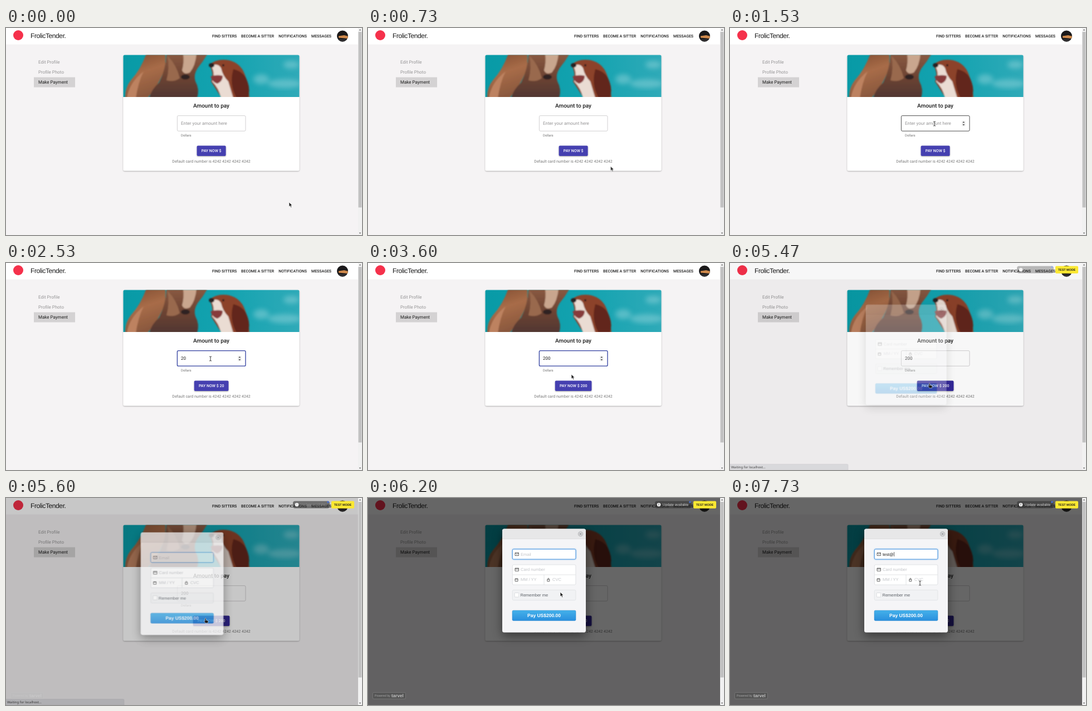
Write an HTML page that moves like this. It is 639 px wide and 372 px high and loops after 8 s.

```html
<!DOCTYPE html>
<html lang="en">
<head>
<meta charset="utf-8">
<title>Payment flow</title>
<style>
html, body { margin: 0; width: 100%; height: 100%; overflow: hidden; background: #f5f3f4; }
svg { display: block; width: 100%; height: 100%; }
text { font-family: Roboto, sans-serif; font-size: 8px; fill: #1c1c1c; white-space: pre; text-rendering: geometricPrecision; }
.mid { text-anchor: middle; }
.muted { fill: #969596; }
.nav text, .label { font-size: 7px; font-weight: 500; }
.brand { font: 12px "Liberation Sans", Arial, sans-serif; letter-spacing: -.4px; }
.form text { font: 7.5px "Liberation Sans", Arial, sans-serif; fill: #c3c5c9; }
.form .remember { fill: #5d6268; }
.form .typed { fill: #222; }
.form .pay { font-size: 8.5px; font-weight: 700; fill: #fff; }
.small { font-family: "Liberation Sans", Arial, sans-serif; }
.icon { fill: none; stroke: #555; stroke-width: .9; }

.anim { animation: 8s linear infinite; }
.step { animation: 8s step-end infinite; }
.field { animation-name: field; }
.spinner { animation-name: spinner; }
.button { animation-name: button; }
.status { animation-name: status; }
.arrow { animation-name: arrow; }
.hand { animation-name: hand; }
.ibeam { animation-name: ibeam; }
.badge { animation-name: badge; }
.pill { animation-name: pill; }
.shade { animation-name: shade; }
.notice { animation-name: notice; }
.focus { animation-name: focus; }
.pointer { animation-name: pointer; }
.modal { animation-name: rise, fade; animation-timing-function: cubic-bezier(.2, .6, .35, 1), linear; transform-origin: 316px 148.5px; }

@keyframes field {
  0%, 100% { stroke: #c6c5c6; stroke-width: .8px; }
  15% { stroke: #222; stroke-width: .8px; }
  22.5% { stroke: #303f9f; stroke-width: 1.3px; }
  54.1% { stroke: #c6c5c6; stroke-width: .8px; }
}
@keyframes spinner { 0%, 54.1%, 100% { opacity: 0; } 15% { opacity: 1; } }
@keyframes button { 0%, 100% { fill: #453fb0; } 49% { fill: #342c9c; } }
@keyframes status { 0%, 73%, 100% { opacity: 0; } 55% { opacity: 1; } }
@keyframes arrow { 0%, 35.6%, 75%, 100% { opacity: 1; } 15%, 66%, 81.3% { opacity: 0; } }
@keyframes hand { 0%, 75%, 100% { opacity: 0; } 66% { opacity: 1; } }
@keyframes ibeam { 0%, 35.6%, 100% { opacity: 0; } 15%, 81.3% { opacity: 1; } }
@keyframes badge { 0%, 100% { opacity: 0; } 67.5% { opacity: 1; } }
@keyframes pill { 0%, 66.5% { opacity: 0; } 70%, 100% { opacity: 1; } }
@keyframes shade { 0%, 68.1% { opacity: 0; } 73.3%, 100% { opacity: 1; } }
@keyframes notice { 0%, 68.5% { opacity: 0; } 73.5%, 100% { opacity: 1; } }
@keyframes focus { 0%, 68.5% { opacity: 0; } 71%, 100% { opacity: 1; } }
@keyframes fade { 0%, 67.5% { opacity: 0; } 70.7%, 100% { opacity: 1; } }
@keyframes rise {
  0%, 67.5% { transform: translateY(27px) scale(.944); }
  73.7%, 100% { transform: none; }
}
@keyframes pointer {
  0%, .9% { transform: translate(508px, 313px); animation-timing-function: ease-in; }
  10.9% { transform: translate(408px, 224px); animation-timing-function: ease-out; }
  18%, 35% { transform: translate(367px, 172px); animation-timing-function: ease-in-out; }
  39.1%, 45.5% { transform: translate(365px, 200px); animation-timing-function: ease-in-out; }
  52.5%, 72.5% { transform: translate(358px, 217px); animation-timing-function: ease-in-out; }
  77%, 78.5% { transform: translate(345px, 169px); animation-timing-function: ease-in-out; }
  85%, 100% { transform: translate(341px, 153px); }
}
</style>
</head>
<body>
<svg viewBox="0 0 639 372" preserveAspectRatio="none">
  <defs>
    <clipPath id="photo"><path d="M210.5 124V51q0-2.5 2.5-2.5h311q2.5 0 2.5 2.5v73z"/></clipPath>
    <clipPath id="face"><circle cx="604" cy="14.5" r="10"/></clipPath>
    <linearGradient id="sky"><stop stop-color="#089aa6"/><stop offset=".6" stop-color="#14a3b0"/><stop offset="1" stop-color="#2faab8"/></linearGradient>
    <linearGradient id="fur" x2=".3" y2="1"><stop stop-color="#7d4a30"/><stop offset=".5" stop-color="#a86c48"/><stop offset="1" stop-color="#8a583e"/></linearGradient>
    <linearGradient id="coat" x2="0" y2="1"><stop stop-color="#8a5a42"/><stop offset=".5" stop-color="#6e4433"/><stop offset="1" stop-color="#503630"/></linearGradient>
    <linearGradient id="blue" x2="0" y2="1"><stop stop-color="#44b1ea"/><stop offset="1" stop-color="#2a8fdd"/></linearGradient>
    <filter id="soft"><feGaussianBlur stdDeviation="4"/></filter>
    <filter id="fuzz"><feGaussianBlur stdDeviation="1.2"/></filter>
    <filter id="lift" x="-10%" y="-10%" width="120%" height="125%"><feDropShadow dx="0" dy="1" stdDeviation=".8" flood-opacity=".35"/></filter>
    <filter id="drop" x="-30%" y="-30%" width="160%" height="160%"><feDropShadow dx="0" dy="6" stdDeviation="9" flood-opacity=".45"/></filter>
    <filter id="glow" x="-10%" y="-30%" width="120%" height="160%"><feDropShadow dx="0" dy="0" stdDeviation="1.2" flood-color="#4a9de8" flood-opacity=".8"/></filter>
  </defs>

  <rect width="639" height="372" fill="#f5f3f4"/>
  <rect width="632" height="29.5" fill="#fff"/>
  <circle cx="22" cy="13" r="9" fill="#f5314b"/>
  <text class="brand" x="44" y="18.3">FrolicTender.</text>
  <g class="nav">
    <text x="370" y="17.3">FIND SITTERS</text>
    <text x="422" y="17.3">BECOME A SITTER</text>
    <text x="489.3" y="17.3">NOTIFICATIONS</text>
    <text x="548" y="17.3">MESSAGES</text>
  </g>
  <g clip-path="url(#face)">
    <rect x="594" y="4" width="21" height="21" fill="#1b191a"/>
    <path d="M597 14.5l10-1.5 8 2v4l-6-.5-12-1z" fill="#d08a4c"/>
    <path d="M594 20h20v5h-20z" fill="#2f2e30"/>
  </g>

  <rect x="50" y="88.5" width="74" height="18" fill="#d4d2d3"/>
  <text class="muted" x="58" y="64.3">Edit Profile</text>
  <text class="muted" x="58" y="82.3">Profile Photo</text>
  <text x="58" y="100.4">Make Payment</text>

  <rect x="210.5" y="48.5" width="316" height="208" rx="2.5" fill="#fff" filter="url(#lift)"/>
  <g clip-path="url(#photo)">
    <rect x="210" y="48" width="317" height="76" fill="url(#sky)"/>
    <g fill="#8fd3da" opacity=".5" filter="url(#soft)">
      <ellipse cx="500" cy="100" rx="30" ry="8"/><ellipse cx="458" cy="92" rx="14" ry="9"/>
      <ellipse cx="512" cy="66" rx="14" ry="7"/>
    </g>
    <g filter="url(#fuzz)">
      <path d="M252 46h34q2 26-6 40-9 20-26 40h-40q-1-18 10-32 17-18 28-48z" fill="url(#fur)"/>
      <path d="M247 78q-26 20-30 48h16q4-28 14-48z" fill="#bd8260"/>
      <path d="M288 46h74q-8 14-18 26-8 12-4 24 8 14 3 30h-86q4-16 18-28 12-24 13-52z" fill="url(#coat)"/>
      <path d="M318 46h24q-2 22-12 34-10 5-14-4 4-14 2-30z" fill="#c9a68e"/>
      <path d="M290 50q16 16 22 40-10 8-24 4 6-22 2-44z" fill="#99694d"/>
      <ellipse cx="322" cy="88" rx="8" ry="4.5" fill="#2d2224"/>
      <path d="M365 66q10-9 25-9 22 0 34 17 10 16 13 52h-50q-10-16-19-30 6-14-3-30z" fill="#8c4229"/>
      <path d="M368 68q12-6 18 4 3 14 13 24l9 30h-22q-4-18-16-30 6-16-2-28z" fill="#eadcd3"/>
      <path d="M408 74q20 4 26 24 5 14 0 28h-20q-14-24-6-52z" fill="#62281b"/>
      <path d="M367 87q12-4 22-1 0 10-10 14-8-2-12-13z" fill="#873a3a"/>
      <ellipse cx="369" cy="67" rx="5" ry="4" fill="#272022"/>
      <circle cx="390" cy="67" r="2" fill="#2d1c19"/>
    </g>
  </g>
  <text class="mid" x="368.5" y="143.3" style="font-size:10px;font-weight:500">Amount to pay</text>
  <rect class="step field" x="307.4" y="157.6" width="122.6" height="27.6" rx="2" fill="#fff"/>
  <text id="amount" x="314" y="174.4"></text>
  <g class="step spinner">
    <rect x="416" y="166.8" width="6.5" height="9.6" fill="#eee"/>
    <path d="M417.4 170.2l1.9-2.2 1.9 2.2zM417.4 173l1.9 2.2 1.9-2.2z" fill="#444"/>
  </g>
  <text x="314" y="195" style="font-size:6px" fill-opacity=".62">Dollars</text>
  <rect id="button" class="step button" y="211.5" height="18.5" rx="2" filter="url(#lift)"/>
  <text id="label" class="label mid" x="368.7" y="223.3" style="fill:#fff"></text>
  <text class="mid" x="368.5" y="242.3" style="font-size:7px" fill-opacity=".6">Default card number is 4242 4242 4242 4242</text>

  <g class="step status">
    <path d="M0 361.5h210q2 0 2 2V372H0z" fill="#e1e0e4" stroke="#d0cfd4" stroke-width=".5"/>
    <text x="2" y="369" style="font:5.9px 'Noto Sans',sans-serif;fill:#444">Waiting for localhost...</text>
  </g>

  <g class="anim shade">
    <rect width="632" height="372" fill="#000" opacity=".6"/>
    <g class="anim notice">
      <rect x="8.5" y="349.5" width="59" height="11.5" rx="2" fill="#555" stroke="#858585" stroke-width=".6"/>
      <text class="small" x="12" y="357" style="font-size:5.3px;fill:#a8a8a8">Powered by</text>
      <text class="small" x="42" y="358" style="font-size:8.2px;font-weight:700;fill:#bdbdbd">tarvel</text>
    </g>
  </g>
  <g class="step badge">
    <g class="anim pill">
      <rect x="515" y="5.5" width="66" height="13" rx="4" fill="#333" opacity=".6"/>
      <circle cx="578" cy="7.3" r="1.8" fill="#4a6fd0"/>
    </g>
    <rect x="584" y="5.5" width="41" height="13.3" rx="2" fill="#fbe832"/>
    <text class="small mid" x="604.5" y="14.1" style="font-size:5.4px;font-weight:700">TEST MODE</text>
    <circle cx="522" cy="12" r="3.3" fill="#f2f2f2"/>
    <path class="anim notice" d="M522 10v2.4m0 .8v.8" stroke="#444" stroke-width=".9"/>
    <text class="small anim notice" x="529" y="14.2" style="font-size:6.2px;fill:#d8d8d8">Update available</text>
  </g>

  <g class="anim modal form">
    <rect x="241" y="55.5" width="150" height="186" rx="3.5" fill="#f5f5f7" filter="url(#drop)"/>
    <path d="M241 73.5V59q0-3.5 3.5-3.5h143q3.5 0 3.5 3.5v14.5z" fill="#e7e7e8"/>
    <path d="M241 73.5h150" stroke="#d5d5d7" stroke-width=".6"/>
    <circle cx="381.5" cy="64.6" r="4.1" fill="#d6d6d8" stroke="#aaabad" stroke-width=".8"/>
    <path d="M379.8 62.9l3.4 3.4m0-3.4l-3.4 3.4" stroke="#808285"/>
    <g class="anim focus">
      <rect x="259.3" y="92" width="113.6" height="18" rx="2" fill="#fff" stroke="#5298df" filter="url(#glow)"/>
      <path class="icon" d="M264 98.5h6.4v5H264zl3.2 2.8 3.2-2.8"/>
      <text id="email" x="274" y="103.7"></text>
      <rect id="caret" y="97" width=".7" height="8" fill="#222"/>
    </g>
    <rect x="259.3" y="120" width="113.6" height="36" rx="2" fill="#fff" stroke="#d6d9dc" stroke-width=".7"/>
    <path d="M259.3 138h113.6M316 138v18" stroke="#d6d9dc" stroke-width=".7"/>
    <path class="icon" d="M264 126h6.4v5.2H264zm0 1.6h6.4M264 145h5v4.6h-5zm0 .8h5M321.8 146.3h4v3.4h-4zm.8 0v-1.3q1.2-2 2.4 0v1.3"/>
    <text x="274" y="131.3">Card number</text>
    <text x="274" y="149.3">MM / YY</text>
    <text x="331" y="149.3">CVC</text>
    <rect x="259.3" y="165.3" width="113.6" height="18.4" rx="2" fill="#f1f2f4" stroke="#dcdee1" stroke-width=".7"/>
    <rect x="263.2" y="170.4" width="7.6" height="7.6" rx="1" fill="#fff" stroke="#cfd2d6" stroke-width=".7"/>
    <text class="remember" x="273.5" y="177.1">Remember me</text>
    <rect x="259" y="202" width="114" height="18.5" rx="2" fill="url(#blue)" stroke="#2b85c9" stroke-width=".5"/>
    <text class="pay mid" x="316" y="214">Pay US$200.00</text>
  </g>

  <rect x="632" width="7" height="372" fill="#f1f1f1"/>
  <rect x="632.5" y="7" width="6" height="315.5" fill="#c1c1c1"/>
  <path d="M633.7 4.3l1.8-2 1.8 2zM633.7 367.8l1.8 2 1.8-2z" fill="#555"/>

  <g class="anim pointer">
    <path class="step arrow" d="M0 0v8.3l1.9-1.7 1.4 3 1.5-.7-1.4-2.9h2.6z" fill="#222" stroke="#fff" stroke-width=".7"/>
    <path class="step hand" d="M-.8-.5q1-1 1.9 0v3l3.2.9q.8.3.7 1.2l-.6 3.2H-.2L-2.4 4.6q0-1 1.6-.4z" fill="#1c1c1c" stroke="#fff" stroke-width=".5"/>
    <g class="step ibeam" fill="none">
      <path d="M-2-4q2 0 2 1 0-1 2-1M0-3v6m-2 1q2 0 2-1 0 1 2 1" stroke="#fff" stroke-width="2"/>
      <path d="M-2-4q2 0 2 1 0-1 2-1M0-3v6m-2 1q2 0 2-1 0 1 2 1" stroke="#222" stroke-width=".9"/>
    </g>
  </g>
</svg>
<script>
const LOOP = 8000;
const el = id => document.getElementById(id);
const [amount, button, label, email, caret] = ['amount', 'button', 'label', 'email', 'caret'].map(el);
const clock = button.getAnimations()[0];

const typed = (text, times, now) => text.slice(0, times.filter(t => now >= t).length);

function setText(node, text) {
  if (node.textContent !== text) node.textContent = text;
}

function fill(node, value, placeholder) {
  setText(node, value || placeholder);
  node.classList.toggle('typed', !!value);
  node.classList.toggle('muted', !value);
}

function draw(wall) {
  const now = (clock?.currentTime ?? wall) % LOOP;

  const sum = typed('200', [2200, 2400, 2600], now);
  fill(amount, sum, 'Enter your amount here');
  setText(label, 'PAY NOW $' + (sum && ' ' + sum));
  const width = 52 + (sum ? 1.8 + 3.95 * sum.length : 0);
  button.setAttribute('x', 368.6 - width / 2);
  button.setAttribute('width', width);

  const address = typed('test@', [6930, 7060, 7200, 7330, 7670], now);
  fill(email, address, 'Email');
  caret.setAttribute('x', 274.4 + (address ? email.getComputedTextLength() : 0));
  caret.setAttribute('opacity', address ? 1 : 0);
  requestAnimationFrame(draw);
}
draw(performance.now());
</script>
</body>
</html>
```
